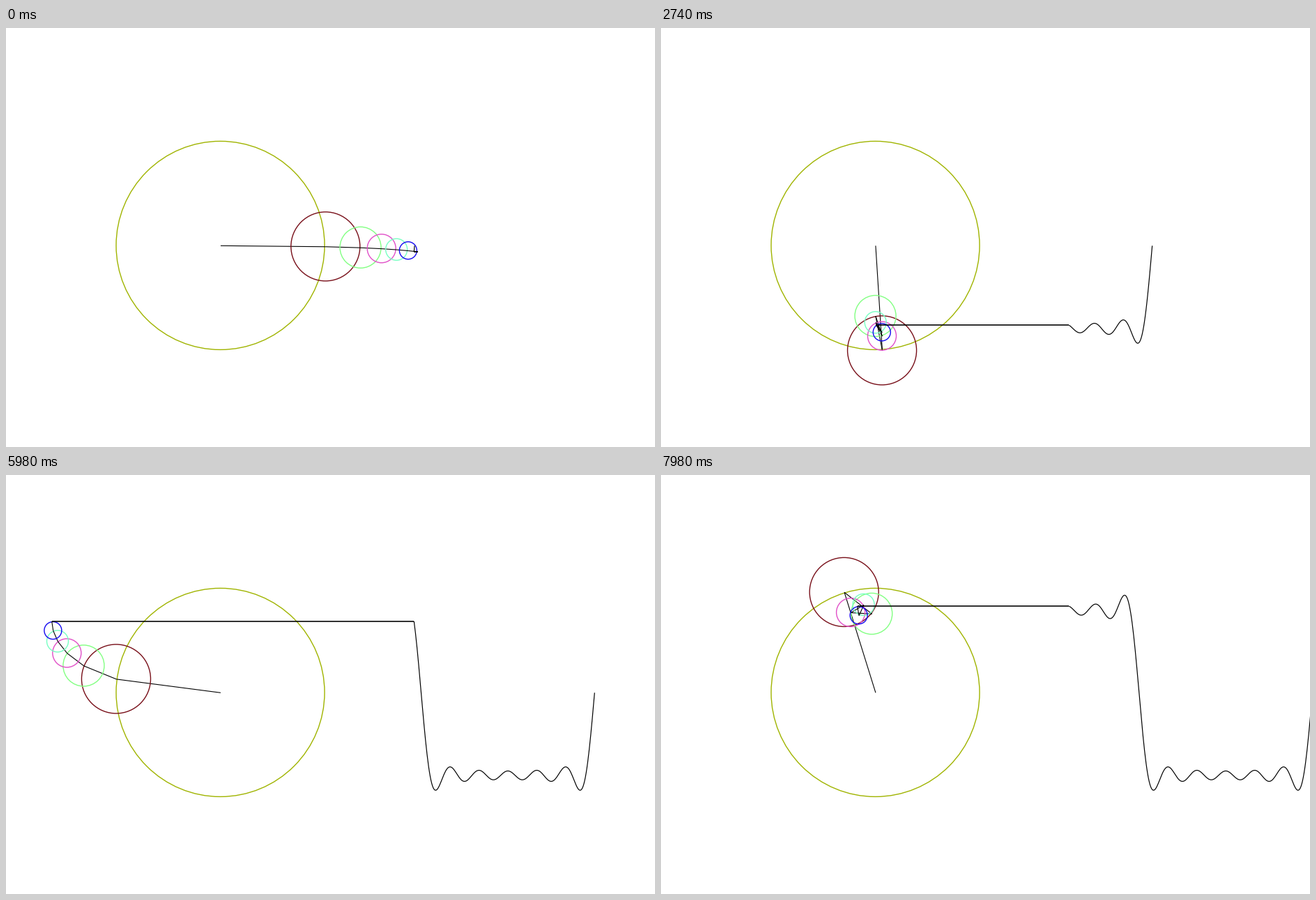
A matplotlib script for the animation above (8 s loop, 931 by 601 pixels).

```python
import numpy as np
import matplotlib.pyplot as plt
from matplotlib.animation import FuncAnimation
from matplotlib.patches import Circle

W, H, DPI = 931, 601, 100
STEP, LOOP = 20, 8000           # ms
CENTER = np.array([307.5, 311.9])
R = 150.8                       # amplitude of the first harmonic
TRACE_X = 585.3                 # where the wave is written
DEG_PER_PX = 0.7235             # phase per pixel of the scrolling wave
PEN = 0.4                       # black lines sit slightly right of and below the rings
ORDERS = np.arange(1, 12, 2)
COLORS = ["#a0b400", "#780f19", "#82ff82", "#e150c8", "#78ffc3", "#140af0"]

# Phase in degrees over time, with three short stalls
TIMES = [0, 1220, 2380, 2460, 4740, 4840, 4920, 5720, 5800, 5980, 6720, 7980]
PHASES = [0.55, 39.0, 77.2, 77.2, 151.8, 155.1, 155.1, 181.3, 181.3,
          187.4, 212.6, 252.7]


def px(width):
    return width * 72 / DPI


def wave(deg):
    angles = np.outer(ORDERS, np.radians(deg))
    return R * (np.sin(angles) / ORDERS[:, None]).sum(axis=0)


def joints(deg):
    a = ORDERS * np.radians(deg)
    arms = R / ORDERS[:, None] * np.column_stack([np.cos(a), np.sin(a)])
    return np.vstack([CENTER, CENTER + np.cumsum(arms, axis=0)])


fig = plt.figure(figsize=(W / DPI, H / DPI), dpi=DPI, facecolor="white")
ax = fig.add_axes([0, 0, 1, 1])
ax.set_xlim(0, W)
ax.set_ylim(H, 0)
ax.axis("off")


def black_line(width, z, snap=False):
    return ax.plot([], [], color="black", lw=px(width), zorder=z, snap=snap,
                   solid_capstyle="butt", solid_joinstyle="round")[0]


circles, arms = [], []
for k, (n, color) in enumerate(zip(ORDERS, COLORS)):
    ring = Circle(CENTER, int(R / n) - 0.5, fill=False, ec=color, lw=px(1.4),
                  zorder=2 * k + 2, snap=False)
    circles.append(ax.add_patch(ring))
    arms.append(black_line(1.1, 2 * k + 3))
link = black_line(1.6, 20, snap=True)
trace = black_line(1.2, 21)


def draw(i):
    deg = np.interp(i * STEP, TIMES, PHASES)
    pts = joints(deg)
    for ring, arm, a, b in zip(circles, arms, pts[:-1], pts[1:]):
        ring.center = tuple(a)
        arm.set_data([a[0] + PEN, b[0] + PEN], [a[1] + PEN, b[1] + PEN])

    past = np.linspace(deg, 0, int(deg / 0.8) + 2)
    y = CENTER[1] + PEN + wave(past)
    trace.set_data(TRACE_X + (deg - past) / DEG_PER_PX, y)
    link.set_data([pts[-1, 0] + PEN, TRACE_X], [y[0], y[0]])
    return [*circles, *arms, link, trace]


anim = FuncAnimation(fig, draw, frames=LOOP // STEP, interval=STEP,
                     init_func=lambda: draw(0), repeat=True, repeat_delay=0,
                     blit=False)
plt.show()
```
